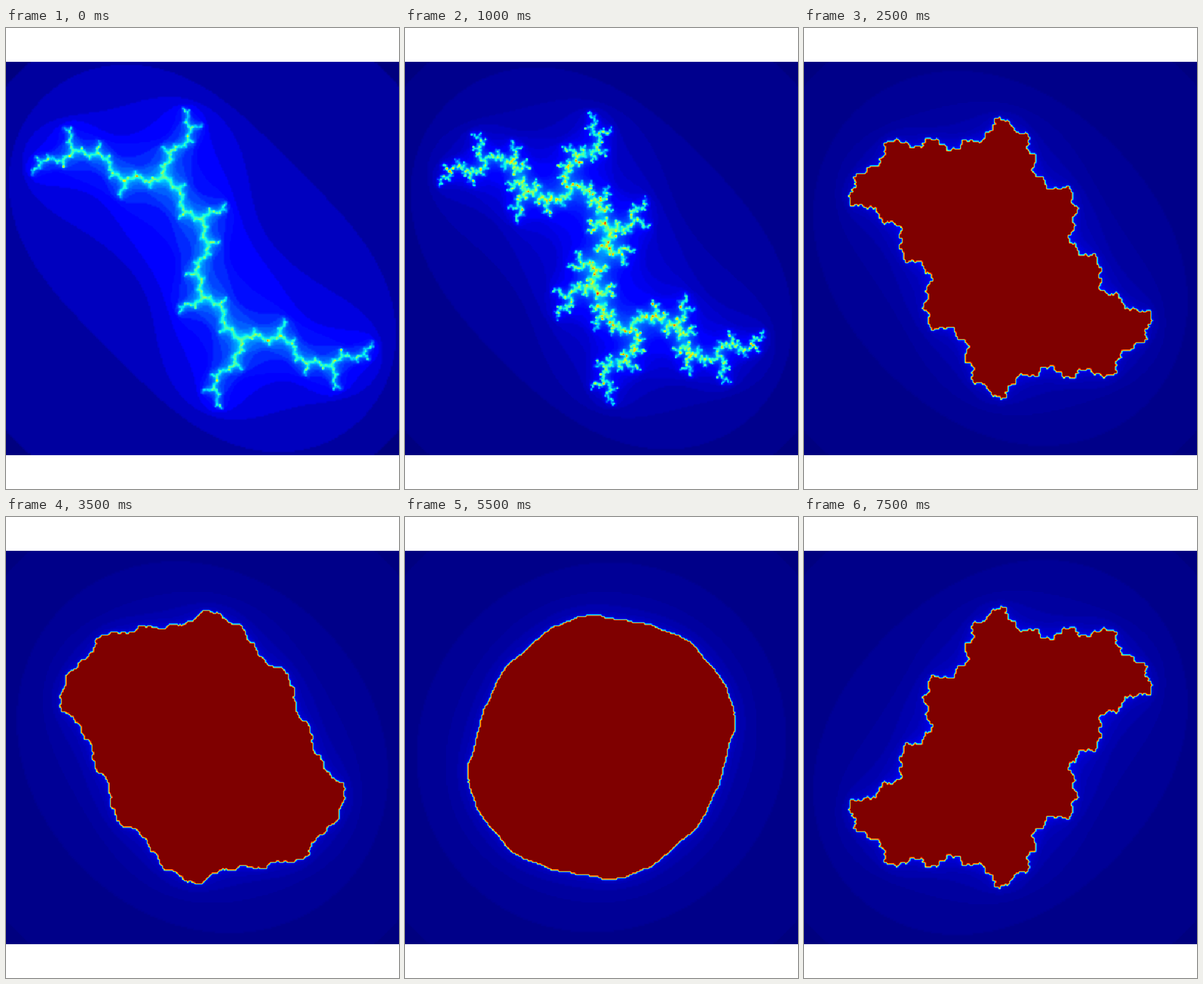
Recreate the animation shown at these times as an HTML page with a canvas. Size 640x750 px, loop 8 s.

```html
<!DOCTYPE html>
<html lang="en">
<head>
<meta charset="utf-8">
<title>Julia sets along the imaginary axis</title>
<style>
html, body { margin: 0; width: 100%; height: 100%; overflow: hidden; background: #fff; }
canvas { display: block; }
</style>
</head>
<body>
<canvas id="stage" width="640" height="750"></canvas>
<script>
const STEP = 500, STEPS = 16;
const GRID = 256, SIZE = 640, TOP = 55, SPAN = 1.5, MAX_ITER = 100;
const PEAKS = [36, 36, 72];   // colour scale tops of the first, fast-escaping sets

const ctx = document.getElementById('stage').getContext('2d');
const image = ctx.createImageData(SIZE, SIZE);
const pixels = new Uint32Array(image.data.buffer);
const counts = new Float32Array(GRID * GRID);

// Piecewise linear curve through [position, value] points.
function curve(points, x) {
  for (let i = 1; i < points.length; i++) {
    const [x0, y0] = points[i - 1], [x1, y1] = points[i];
    if (x <= x1) return y0 + (y1 - y0) * (x - x0) / (x1 - x0);
  }
  return points[points.length - 1][1];
}

const RED = [[0, 0], [.35, 0], [.66, 1], [.89, 1], [1, .5]];
const GREEN = [[0, 0], [.125, 0], [.375, 1], [.64, 1], [.91, 0], [1, 0]];
const BLUE = [[0, .5], [.11, 1], [.34, 1], [.65, 0], [1, 0]];

const palette = Uint32Array.from({ length: 256 }, (_, i) => {
  const [r, g, b] = [RED, GREEN, BLUE].map(c => Math.floor(curve(c, i / 255) * 255.99));
  return (255 << 24 | b << 16 | g << 8 | r) >>> 0;
});

// Neighbouring cells and blend weight for each screen pixel on one axis.
function axis(shift) {
  return Array.from({ length: SIZE }, (_, p) => {
    const sub = Math.floor((p + .5 + shift) * 2 * GRID / SIZE);
    const pos = Math.min(GRID - 1, Math.max(0, (sub + .5) / 2 - .5));
    const a = Math.floor(pos);
    return { a, b: Math.min(GRID - 1, a + 1), t: pos - a };
  });
}
const cols = axis(0), rows = axis(.3);

function escapeCount(x, y, ci) {
  let n = 0;
  while (n < MAX_ITER && x * x + y * y <= 4) {
    const next = x * x - y * y;
    y = 2 * x * y + ci;
    x = next;
    n++;
  }
  return n;
}

function draw(step) {
  const ci = (10 - step) / 10;
  const peak = PEAKS[step] || MAX_ITER;
  const coord = i => -SPAN + 2 * SPAN * i / (GRID - 1);

  for (let j = 0; j < GRID; j++) {
    for (let i = 0; i < GRID; i++) {
      counts[j * GRID + i] = Math.min(1, escapeCount(coord(i), -coord(j), ci) / peak);
    }
  }

  let k = 0;
  for (const row of rows) {
    const upper = row.a * GRID, lower = row.b * GRID;
    for (const { a, b, t } of cols) {
      const u = counts[upper + a] * (1 - t) + counts[upper + b] * t;
      const v = counts[lower + a] * (1 - t) + counts[lower + b] * t;
      const value = u + (v - u) * row.t;
      pixels[k++] = palette[Math.min(255, Math.floor(value * 256 + 1e-4))];
    }
  }
  ctx.putImageData(image, 0, TOP);
}

const start = performance.now();
let shown = -1;

function tick() {
  const step = Math.floor((performance.now() - start) / STEP) % STEPS;
  if (step !== shown) draw(shown = step);
  requestAnimationFrame(tick);
}
tick();
</script>
</body>
</html>
```
